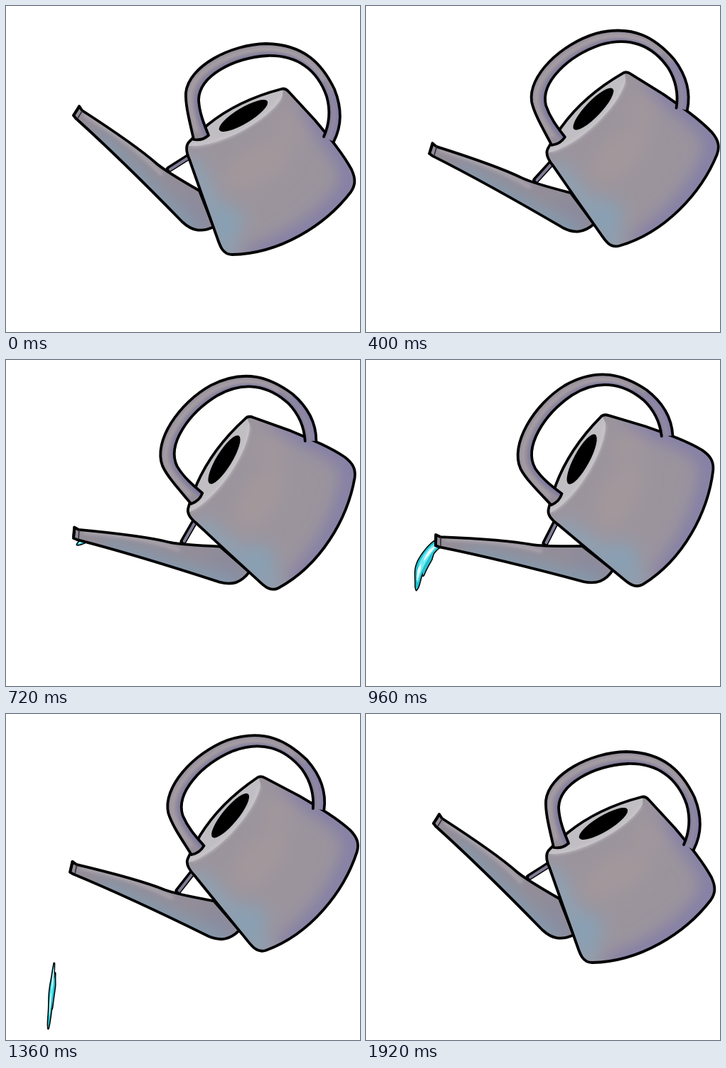
Write an HTML page that moves like this. It is 498x459 px and loops after 2.48 s.

```html
<!DOCTYPE html>
<html lang="en">
<head>
<meta charset="utf-8">
<title>Watering can</title>
<style>
html, body { margin: 0; width: 100%; height: 100%; overflow: hidden; background: #fff; }
svg { display: block; width: 498px; height: 459px; }
.ink { fill: none; stroke: #000; stroke-width: 3.8; stroke-linejoin: round; stroke-linecap: round; }
.soft { filter: url(#blur); }
.line { fill: none; stroke-linecap: round; }
</style>
</head>
<body>
<svg viewBox="0 0 498 459">
  <defs>
    <filter id="blur" x="-30%" y="-30%" width="160%" height="160%"><feGaussianBlur stdDeviation="12"/></filter>
    <filter id="fine" x="-30%" y="-30%" width="160%" height="160%"><feGaussianBlur stdDeviation="2.2"/></filter>
    <path id="body" d="M257 192C252 198 254 207 258 216L277 270 297 326C301 338 305 350 318 350C385 349 449 309 485 262C492 252 492 243 486 230C473 206 454 184 434 160L398 121Q393 115 387 117C345 128 310 146 284 167C272 178 263 185 257 192Z"/>
    <path id="spout" d="M103 141L107 147C144 171 185 198 212 222Q225 233 272 260L292 311C275 319 262 317 248 304C210 265 160 214 98 158L95 154Z"/>
    <path id="handle" d="M264 188C259 165 252 140 253 122C257 85 315 54 366 53C420 54 445 82 462 117C472 142 474 166 461 191L447 184C455 166 457 148 451 127C438 90 410 69 368 70C320 73 272 98 271 132C272 150 278 165 285 182Q276 190 264 188Z"/>
    <clipPath id="inBody"><use href="#body"/></clipPath>
    <clipPath id="inSpout"><use href="#spout"/></clipPath>
    <clipPath id="inHandle"><use href="#handle"/></clipPath>
  </defs>

  <g id="water" stroke-linejoin="round">
    <path stroke="#000" stroke-width="3"/>
    <path fill="#22bfce"/>
    <path fill="#6fecf2"/>
    <path fill="#f4ffff"/>
  </g>

  <g id="can">
    <use href="#spout" fill="#938d98"/>
    <g clip-path="url(#inSpout)">
      <g class="soft">
        <path class="line" d="M130 192L262 318" stroke="#7d9fb6" stroke-width="18"/>
        <path class="line" d="M258 268L285 312" stroke="#86889f" stroke-width="16"/>
      </g>
      <path class="line" d="M112 154Q180 196 218 236" stroke="#aaa4ac" stroke-width="5" filter="url(#fine)"/>
    </g>
    <use href="#spout" class="ink"/>
    <path d="M103 142L95 154" class="ink"/>
    <path d="M107 148L101 158" class="line" stroke="#302b34" stroke-width="1.6"/>

    <path d="M229 230L259 211" class="line" stroke="#000" stroke-width="9"/>
    <path d="M231 230L259 212" class="line" stroke="#827b95" stroke-width="4"/>

    <use href="#body" fill="#9b949d"/>
    <g clip-path="url(#inBody)">
      <g class="soft">
        <path class="line" d="M425 150Q482 205 488 250Q440 320 350 352" stroke="#817ba8" stroke-width="26"/>
        <path class="line" d="M262 225Q284 270 312 345" stroke="#8ba3b6" stroke-width="24"/>
        <ellipse cx="308" cy="305" rx="26" ry="26" fill="#88a0b4"/>
        <ellipse cx="352" cy="226" rx="52" ry="26" fill="#a2989b" transform="rotate(-30 352 226)"/>
        <ellipse cx="400" cy="170" rx="28" ry="24" fill="#a0979c"/>
      </g>
      <path d="M254 197C300 200 372 160 389 127L390 112 330 132 262 183Z" fill="#c1bec3"/>
      <path class="line" d="M262 196C304 195 364 162 386 130" stroke="#cbc8cc" stroke-width="3" filter="url(#fine)"/>
    </g>
    <use href="#body" class="ink"/>
    <ellipse cx="334" cy="154.500" rx="39.500" ry="11" transform="rotate(-31 334 154.500)"/>

    <use href="#handle" fill="#958e9a"/>
    <g clip-path="url(#inHandle)">
      <g filter="url(#fine)">
        <path class="line" d="M284 185C276 165 270 150 270 132C271 98 320 73 368 70C410 69 438 90 451 127C457 148 455 166 447 184" stroke="#7f79a0" stroke-width="8"/>
        <path class="line" d="M462 122C470 146 470 168 458 192" stroke="#8781a8" stroke-width="10"/>
        <path class="line" d="M268 176C262 155 257 140 259 122C266 90 315 63 366 60C405 61 432 78 446 104" stroke="#aca4a8" stroke-width="4"/>
      </g>
    </g>
    <path class="ink" d="M447 184C455 166 457 148 451 127C438 90 410 69 368 70C320 73 272 98 271 132C272 150 278 165 285 182Q276 190 264 188C259 165 252 140 253 122C257 85 315 54 366 53C420 54 445 82 462 117C472 142 474 166 461 191"/>
  </g>
</svg>
<script>
const LOOP = 2480, STEP = 40, END = 1920;
const can = document.getElementById('can');
const [ink, rim, core, shine] = document.querySelectorAll('#water path');

// Keys are rows of [time, values...], joined by straight lines.
const TILT = [[0, 0], [800, 30.7], [1040, 30.7], [END, 0]];
// Stream: top, bottom, half width
const FLOW = [
  [680, 250, 250, 0], [720, 252, 260, 3], [960, 256, 324, 7.5], [1120, 258, 394, 12],
  [1240, 300, 462, 8], [1360, 351, 443, 3], [1480, 430, 464, 2], [1560, 464, 472, 0]
];

function sample(keys, t) {
  const i = keys.findIndex(k => k[0] >= t);
  if (i < 0) return keys[keys.length - 1].slice(1);
  if (i === 0) return keys[0].slice(1);
  const a = keys[i - 1], b = keys[i], u = (t - a[0]) / (b[0] - a[0]);
  return a.slice(1).map((v, j) => v + (b[j + 1] - v) * u);
}

// Ribbon of water along the falling curve
function ribbon(top, bottom, width, shift, open, phase) {
  const left = [], right = [], n = 18;
  for (let i = 0; i <= n; i++) {
    const s = i / n, y = top + (bottom - top) * s;
    const bend = 27 * Math.exp((258 - y) / 18), slope = -0.09 - bend / 18;
    const len = Math.hypot(1, slope), x = 70 - (y - 325) * 0.09 + bend + shift;
    const taper = (1 - s) ** 0.45 * Math.min(1, open + s * 3);
    const half = width * (0.75 + 0.35 * Math.sin(3.1 * s)) * taper;
    const point = side => {
      const h = half * (1 + 0.15 * Math.sin(y / 7 + phase + side)) * side;
      return (x + h / len).toFixed(1) + ' ' + (y - h * slope / len).toFixed(1);
    };
    left.push(point(-1));
    right.unshift(point(1));
  }
  return 'M' + left.concat(right).join('L') + 'Z';
}

function pour(t) {
  const [top, bottom, w] = sample(FLOW, t);
  const long = bottom - top, open = t <= 1120 ? 1 : 0, phase = t / 90;
  const part = (from, to, width, shift, o) =>
    ribbon(top + long * from, top + long * to, w * width, w * shift, o, phase);
  const outer = part(0, 1, 1, 0, open) + part(0.15, 0.7, 0.5, 0.85, 0);
  ink.setAttribute('d', outer);
  rim.setAttribute('d', outer);
  core.setAttribute('d', part(0.04, 0.85, 0.6, 0, open));
  shine.setAttribute('d', part(0.06, 0.4, 0.3, 0.1, 0) + part(0.45, 0.8, 0.3, -0.15, 0));
  ink.parentNode.style.display = w > 0 ? '' : 'none';
}

function draw(now) {
  const t = Math.min(END, Math.floor(now % LOOP / STEP) * STEP);
  can.setAttribute('transform', `rotate(${-sample(TILT, t)[0]} 291.7 202.4)`);
  pour(t);
}

const start = performance.now();
function tick() {
  draw(performance.now() - start);
  requestAnimationFrame(tick);
}
tick();
</script>
</body>
</html>
```
